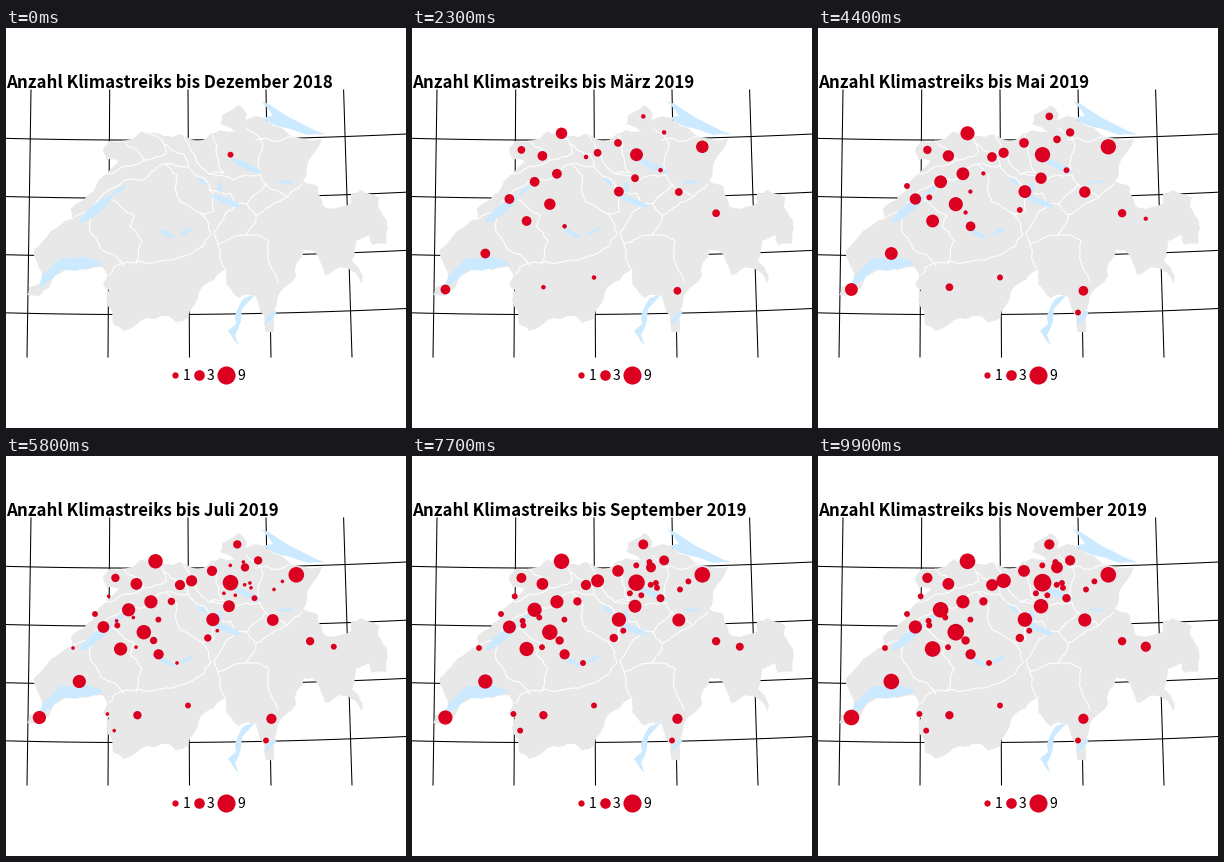
These frames come from a looping animation (400x400 px, 10 s). A matplotlib script:

```python
import matplotlib.pyplot as plt
import numpy as np
from matplotlib.animation import FuncAnimation

SIZE, FRAMES, DAYS = 400, 100, 350
LAND, LAKE, RED = "#e8e8e8", "#cceaff", "#dc0020"
PX = 0.72  # points per pixel at 100 dpi
rng = np.random.default_rng(4)

# Strike days, counted from the first one, lettered a to l
KEYS = "abcdefghijkl"
KEY_DAYS = [0, 7, 35, 50, 91, 113, 141, 161, 233, 280, 289, 350]
MONTHS = [(0, "Dezember 2018"), (18, "Januar 2019"), (49, "Februar 2019"),
          (77, "März 2019"), (108, "April 2019"), (138, "Mai 2019"),
          (169, "Juni 2019"), (199, "Juli 2019"), (230, "August 2019"),
          (261, "September 2019"), (291, "Oktober 2019"),
          (322, "November 2019")]

# Places by the strike days they took part in
REGULAR = {
    "abcdefhjk": [(224.5, 126.7)],
    "bcdeefh": [(290.3, 118.8)],
    "bcdefhj": [(149.5, 105.3)],
    "bcdefhjk": [(137.8, 176.2)],
    "cdefhjk": [(73.3, 225.5), (33.4, 261.5), (122.6, 153.8), (114.6, 193)],
    "cdefh": [(144.9, 145.8)],
    "cdeh": [(130.4, 127.9)],
    "cdehj": [(97.4, 171)],
    "cdefhj": [(206.9, 163.6)],
    "defijk": [(185.6, 124.8)],
    "cehj": [(206, 114.9)],
    "defhjk": [(223, 150.2)],
    "defhj": [(266.8, 164)],
    "de": [(304.1, 185.2)],
    "deh": [(265.4, 262.8)],
    "dej": [(109.4, 121.9)],
}
LATER = {
    "efhl": [(174, 129)],
    "ehj": [(231.3, 88.4)],
    "efj": [(252.1, 104.4)],
    "fhjl": [(239, 111.4)],
    "ej": [(248.5, 142.2)],
    "hjl": [(327.8, 190.7)],
    "fi": [(201.8, 182)],
    "efh": [(152.6, 198.3)],
    "eh": [(131.4, 259.2)],
    "e": [(182, 249.5)],
    "f": [(260, 284.5), (89, 158)],
    "g": [(111.3, 169.4)],
    "h": [(152.4, 163.6)],
    "hi": [(165.4, 145.4), (147.6, 184.5)],
    "i": [(102.7, 140.3), (110.6, 164.9), (127.3, 161.5), (130, 191.2),
          (67, 192), (171, 207), (101.4, 258), (108.2, 274.6),
          (211.3, 174.7), (217.9, 137.3), (229.3, 139.3), (224.3, 109.4),
          (237.4, 106), (238.7, 128.8), (243.9, 127), (245, 131.8),
          (268, 133.5), (276.4, 125.4)],
}

NORTH = [(21, 267), (23, 259), (35, 256), (31, 234), (28, 222), (45, 203),
         (66, 191), (65, 181), (78, 172), (92, 153), (113, 133), (101, 132),
         (97, 122), (103, 113), (117, 113), (136, 103), (158, 108),
         (175, 106), (197, 112), (214, 102), (233, 105), (214, 96),
         (216, 87), (232, 77), (241, 86), (239, 92), (250, 88), (276, 100),
         (316, 111)]
EAST = [(302, 134), (297, 153), (312, 159), (317, 177), (327, 181),
        (345, 175), (345, 166), (355, 162), (374, 170), (372, 179),
        (379, 190), (382, 200), (380, 216), (366, 217), (363, 207),
        (350, 213), (346, 233), (357, 248), (355, 256), (346, 243),
        (334, 239), (319, 247), (306, 222), (298, 222), (290, 248)]
SOUTH = [(272, 268), (268, 304), (259, 303), (258, 288), (249, 267),
         (233, 270), (220, 256), (220, 242), (208, 252), (193, 264),
         (182, 290), (170, 295), (160, 287), (142, 290), (117, 303),
         (107, 296), (100, 272), (103, 262), (97, 257), (101, 246),
         (96, 239), (63, 241), (48, 248), (34, 268)]

# Large lakes as outlines, small ones as start, end and width
OUTLINES = [
    [(33, 259), (37, 247), (55, 230), (82, 229), (98, 236), (84, 240),
     (55, 242), (37, 258)],
    [(255, 73), (284, 90), (319, 106), (302, 107), (275, 99), (257, 90),
     (267, 88)],
    [(249, 267), (236, 281), (235, 292), (229, 307), (233, 317),
     (222, 303), (230, 296), (229, 288), (238, 270)],
]
LENSES = [(74, 194, 106, 168, 9), (106, 167, 120, 157, 4),
          (225, 131, 256, 145, 6), (213, 154, 215, 165, 5),
          (205, 167, 236, 179, 6), (152, 201, 168, 210, 5),
          (174, 207, 188, 200, 4), (271, 154, 287, 154, 3),
          (259, 295, 270, 283, 5), (192, 150, 200, 157, 4)]

BORDERS = [
    [(66, 191), (92, 172), (116, 154), (139, 151), (160, 136), (182, 138)],
    [(99, 146), (138, 132), (131, 122), (117, 113)],
    [(138, 132), (160, 126), (158, 116), (136, 103)],
    [(160, 136), (171, 148), (174, 174), (196, 186), (208, 183),
     (198, 150), (182, 138), (178, 126), (158, 116)],
    [(176, 106), (190, 130), (203, 146), (218, 145), (207, 107)],
    [(241, 100), (257, 118), (254, 147), (228, 152), (203, 146)],
    [(250, 112), (292, 108)],
    [(254, 147), (281, 169), (296, 156)],
    [(261, 156), (241, 176), (250, 187), (281, 169)],
    [(203, 162), (224, 165), (229, 176), (241, 176)],
    [(229, 178), (208, 204), (212, 216), (240, 207), (250, 187)],
    [(196, 186), (205, 207), (160, 232), (108, 239), (103, 247)],
    [(212, 216), (220, 242)],
    [(240, 207), (263, 213), (272, 254)],
    [(130, 236), (136, 213), (124, 198), (128, 187), (106, 172)],
    [(118, 238), (95, 221), (85, 190)],
]


def rough(points, amp, depth=2):
    """Split every edge with a small random sideways shift."""
    pts = np.array(points, float)
    for _ in range(depth):
        out = np.empty((2 * len(pts) - 1, 2))
        out[::2] = pts
        edge = np.diff(pts, axis=0)
        side = np.column_stack([-edge[:, 1], edge[:, 0]])
        shift = rng.uniform(-amp, amp, (len(edge), 1))
        out[1::2] = (pts[1:] + pts[:-1]) / 2 + side * shift
        pts = out
    return pts


def lens(x0, y0, x1, y1, width):
    t = np.linspace(0, 2 * np.pi, 30)
    along, across = np.cos(t) / 2, np.sin(t) * width / 2
    dx, dy = x1 - x0, y1 - y0
    length = np.hypot(dx, dy)
    return ((x0 + x1) / 2 + along * dx - across * dy / length,
            (y0 + y1) / 2 + along * dy + across * dx / length)


def radius(count):
    return np.where(count > 0, 2.95 * np.sqrt(count), 0)


def area(r):
    return (2 * np.asarray(r) * PX) ** 2


fig = plt.figure(figsize=(SIZE / 100, SIZE / 100), dpi=100,
                 facecolor="white")
ax = fig.add_axes([0, 0, 1, 1])
ax.set(xlim=(0, SIZE), ylim=(SIZE, 0))
ax.axis("off")

# Graticule
grid = dict(color="black", lw=1.05 * PX, zorder=1)
for top, bottom in [(25, 21), (103.7, 102), (182, 183.5), (260, 265),
                    (337.6, 346)]:
    ax.plot([top, bottom], [62, 329], **grid)
x = np.linspace(0, SIZE, 80)
for y in (110.3, 168.5, 226.7, 284.8):
    ax.plot(x, y + 1.8 - 9e-5 * (x - 140) ** 2, **grid)

# Map
ax.fill(*rough(NORTH + EAST + SOUTH, 0.13).T, color=LAND, lw=0, zorder=2)
for line in BORDERS:
    ax.plot(*rough(line, 0.13, 3).T, color="white", lw=1.1 * PX, zorder=3)
for lake in OUTLINES:
    ax.fill(*rough(lake + lake[:1], 0.06).T, color=LAKE, lw=0, zorder=4)
for lake in LENSES:
    ax.fill(*lens(*lake), color=LAKE, lw=0, zorder=4)

# Legend
for n, cx, tx in [(1, 169.4, 177), (3, 192.8, 201), (9, 220.2, 231)]:
    ax.scatter(cx, 347, s=area(radius(n) + 0.2), color=RED, lw=0)
    ax.text(tx, 352, str(n), family="Noto Sans CJK JP", size=14 * PX)

title = ax.text(0, 60, "", family="Noto Sans CJK JP", weight="bold",
                size=16.9 * PX)

spots = [(p, days) for days, group in (REGULAR | LATER).items()
         for p in group]
sizes = np.array([radius(np.cumsum([days.count(k) for k in KEYS]))
                  for _, days in spots])
dots = ax.scatter(*zip(*(p for p, _ in spots)), color=RED, lw=0, zorder=5)


def draw(i):
    day = DAYS * i / (FRAMES - 1)
    dots.set_sizes(area([np.interp(day, KEY_DAYS, r) for r in sizes]))
    month = [name for start, name in MONTHS if start <= day][-1]
    title.set_text("Anzahl Klimastreiks bis " + month)
    return dots, title


anim = FuncAnimation(fig, draw, frames=FRAMES, interval=100, repeat=True,
                     repeat_delay=0)
plt.show()
```
